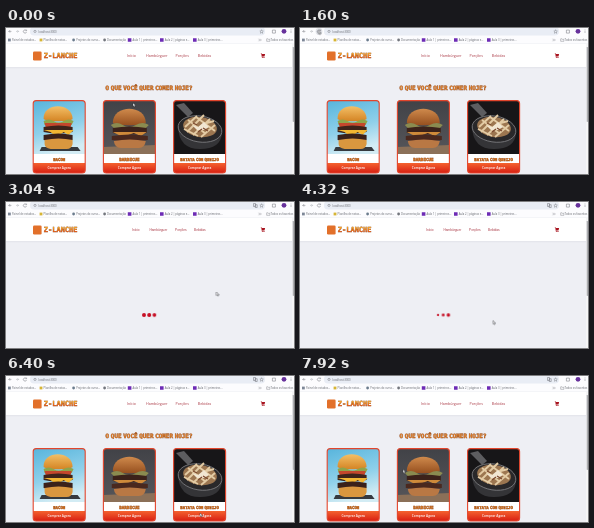
Write an HTML page that moves like this. It is 288 px wide and 146 px high and loops after 8000 ms.

```html
<!DOCTYPE html>
<html lang="pt-BR">
<head>
<meta charset="utf-8">
<title>Z-LANCHE</title>
<style>
html, body { margin: 0; width: 100%; height: 100%; overflow: hidden; background: #fff; }
svg { display: block; width: 288px; height: 146px; }
text { font-family: "Open Sans", sans-serif; }
.mark { font-size: 2.7px; fill: #62656c; }
.nav text { font-size: 3.6px; fill: #a83440; }
.nav.plain text { font: 3.2px "Liberation Sans", sans-serif; }
.slab { font-family: "DejaVu Sans Mono", monospace; font-weight: 700; word-spacing: -.3em; fill: #d9741a; stroke: #7a3410; stroke-width: .4px; paint-order: stroke; }
.mid { text-anchor: middle; }
.buy { font-size: 3.2px; font-weight: 600; fill: #fff; }

/* one 8 s timeline with hard cuts */
.cut { animation: 8s step-end infinite; }
#cards { animation-name: cards; }
#blank { animation-name: blank; }
#plain { animation-name: plain; }
#styled { animation-name: styled; }
#title { animation-name: title; }
#cart { animation-name: cart; }
#white { animation-name: white; }
#bar { animation-name: bar; }
#dots { animation-name: dots; }
#hover { animation-name: hover; }
#translate { animation-name: translate; }
@keyframes cards { 0%, 74% { visibility: visible } 22% { visibility: hidden } }
@keyframes blank { 0%, 25% { visibility: hidden } 22% { visibility: visible } }
@keyframes plain { 0%, 61% { visibility: hidden } 22% { visibility: visible } }
@keyframes styled {
  0%, 74% { visibility: visible; transform: none }
  22% { visibility: hidden; transform: none }
  61% { visibility: visible; transform: translateX(1.6px) }
}
@keyframes title {
  0%, 74% { visibility: visible; transform: none }
  22% { visibility: hidden; transform: none }
  61% { visibility: visible; transform: translateX(1.2px) }
}
@keyframes cart { 0%, 74% { transform: none } 61% { transform: translateX(4px) } }
@keyframes white { 0%, 74% { visibility: hidden } 61% { visibility: visible } }
@keyframes bar { 0%, 74% { visibility: visible } 61% { visibility: hidden } }
@keyframes dots { 0%, 61% { visibility: hidden } 36% { visibility: visible } }
@keyframes hover { 0%, 23% { visibility: hidden } 17% { visibility: visible } }
@keyframes translate { 0% { visibility: hidden } 34% { visibility: visible } }

#dots circle { transform-box: fill-box; transform-origin: center; animation: pulse 1s ease-in-out infinite; }
#dots circle:nth-child(2) { animation-delay: -.92s; }
#dots circle:nth-child(3) { animation-delay: -.84s; }
@keyframes pulse { 0%, 100% { transform: scale(1) } 50% { transform: scale(.4) } }

#cursor { animation: cursor 8s ease-in-out infinite; }
@keyframes cursor {
  0%, 1% { transform: translate(127px, 75px) }
  8% { transform: translate(115px, 84px) }
  15% { transform: translate(30px, 8px) }
  19%, 22% { transform: translate(18.5px, 2.5px) }
  31%, 33% { transform: translate(208px, 88px) }
  35%, 38% { transform: translate(210.5px, 90px) }
  46%, 74% { transform: translate(193px, 118.5px) }
  80%, 84% { transform: translate(194px, 137px) }
  95% { transform: translate(178px, 128px) }
  99%, 100% { transform: translate(103px, 93.5px) }
}
</style>
</head>
<body>
<svg viewBox="0 0 288 146">
  <defs>
    <linearGradient id="red" x2="0" y2="1">
      <stop stop-color="#f4622f"/><stop offset="1" stop-color="#d81f12"/>
    </linearGradient>
    <linearGradient id="gold" x2="0" y2="1">
      <stop offset=".2" stop-color="#f6a01c"/><stop offset=".9" stop-color="#d63a12"/>
    </linearGradient>
    <linearGradient id="sky" x2=".3" y2="1">
      <stop stop-color="#56b4dc"/><stop offset=".6" stop-color="#8fd0ea"/><stop offset="1" stop-color="#d3ecf4"/>
    </linearGradient>
    <linearGradient id="dusk" x2="0" y2="1">
      <stop stop-color="#414247"/><stop offset="1" stop-color="#56565a"/>
    </linearGradient>
    <linearGradient id="bun" x2="0" y2="1">
      <stop stop-color="#f3bf66"/><stop offset="1" stop-color="#d48424"/>
    </linearGradient>
    <linearGradient id="brioche" x2="0" y2="1">
      <stop stop-color="#cf8a4c"/><stop offset="1" stop-color="#96501f"/>
    </linearGradient>
    <linearGradient id="shade" x2="0" y2="1">
      <stop stop-color="#e2e3e9"/><stop offset="1" stop-color="#eeeff4"/>
    </linearGradient>
    <clipPath id="photo"><path d="M.6 54V3.6a3 3 0 0 1 3-3h46a3 3 0 0 1 3 3V54z"/></clipPath>
    <g id="frame">
      <path d="M.6 54H52.6V64H.6z" fill="#fff"/>
      <path d="M.6 63H52.6V70a3 3 0 0 1-3 3h-46a3 3 0 0 1-3-3z" fill="url(#red)"/>
      <rect x=".6" y=".6" width="52" height="72.4" rx="3" fill="none" stroke="#e2452c" stroke-width="1.1"/>
      <text class="buy mid" x="26.6" y="69.4">Comprar Agora</text>
    </g>
  </defs>

  <!-- page -->
  <rect width="288" height="146" fill="#eeeff4"/>
  <rect id="white" class="cut" y="79" width="288" height="67" fill="#fff"/>
  <rect y="39" width="288" height="2" fill="url(#shade)"/>
  <rect y="16" width="288" height="23" fill="#fff"/>

  <rect x="27" y="23.5" width="8.6" height="9" rx="1.2" fill="#e2702a"/>
  <text class="slab" x="37.8" y="30" font-size="7" style="fill:url(#gold)">Z-LANCHE</text>

  <g id="styled" class="nav cut">
    <text x="121" y="28.8">Início</text>
    <text x="140" y="28.8">Hambúrguer</text>
    <text x="169.5" y="28.8">Porções</text>
    <text x="191.8" y="28.8">Bebidas</text>
  </g>
  <g id="plain" class="nav plain cut">
    <text x="126" y="28.7">Início</text>
    <text x="143.5" y="28.7">Hambúrguer</text>
    <text x="169" y="28.7">Porções</text>
    <text x="188" y="28.7">Bebidas</text>
  </g>
  <g id="cart" class="cut" fill="#a8141f">
    <path d="M254.8 25.6h1l.3.5h3l-.6 2.4h-2.3l.1.5h2.2v.4h-2.6l-.6-3.3h-.5z"/>
    <circle cx="256.3" cy="29.5" r=".4"/><circle cx="258.1" cy="29.5" r=".4"/>
  </g>

  <text id="title" class="slab mid cut" x="143" y="62.3" font-size="5.9">O QUE VOCÊ QUER COMER HOJE?</text>

  <g id="cards" class="cut">
    <g transform="translate(26.6 72)">
      <g clip-path="url(#photo)">
        <rect width="54" height="55" fill="url(#sky)"/>
        <path d="M9 47H45L48 51H7z" fill="#363a3f"/>
        <path d="M11 19C10 2 40 2 40 19 37 22 14 22 11 19z" fill="url(#bun)"/>
        <path d="M11 21Q16 18 21 21T31 21T41 21L39 25H12z" fill="#8fa44a"/>
        <path d="M12 23H39L38 27H13z" fill="#c4472c"/>
        <path d="M11 27Q26 24 40 27V32Q26 35 11 32z" fill="#3f241a"/>
        <path d="M11 30H41L36 35 31 32 24 37 18 32z" fill="#f2b632"/>
        <path d="M11 35Q26 32 40 35V40Q26 43 11 40z" fill="#3a211a"/>
        <path d="M12 40Q26 37 40 40V44Q39 49 34 49H18Q12 48 12 44z" fill="#d9973f"/>
      </g>
      <use href="#frame"/>
      <text class="slab mid" x="26.6" y="60.8" font-size="4">BACON</text>
    </g>
    <g transform="translate(96.8 72)">
      <g clip-path="url(#photo)">
        <rect width="54" height="55" fill="url(#dusk)"/>
        <path d="M0 47 54 45V55H0z" fill="#8b7058"/>
        <path d="M10 23C10 4 43 4 43 23 38 26 15 26 10 23z" fill="url(#brioche)"/>
        <path d="M8 25Q14 21 20 25T33 25T46 25L42 29H12z" fill="#8a8b50"/>
        <path d="M10 28Q27 25 44 28V33Q27 36 10 33z" fill="#3c221a"/>
        <path d="M10 32H44L38 36 31 33 20 37z" fill="#cf8a3a"/>
        <path d="M9 36Q27 33 45 36V40Q27 43 9 40z" fill="#4a281e"/>
        <path d="M11 41Q27 38 43 41 42 48 36 48H18Q12 48 11 41z" fill="#b97844"/>
      </g>
      <use href="#frame"/>
      <text class="slab mid" x="26.6" y="60.8" font-size="4.2">BARBECUE</text>
    </g>
    <g transform="translate(167 72)">
      <g clip-path="url(#photo)">
        <rect width="54" height="55" fill="#171618"/>
        <path d="M3 5 11 3 20 13 15 17z" fill="#5d5d60"/>
        <path d="M5 27Q6 49 27 49T49 33z" fill="#343437"/>
        <ellipse cx="27" cy="29" rx="22" ry="13" transform="rotate(9 27 29)" fill="#29282a" stroke="#77777a" stroke-width=".9"/>
        <ellipse cx="27" cy="27" rx="17" ry="10" transform="rotate(9 27 27)" fill="#9c7650"/>
        <path d="M12 27 24 16M14 32 31 15M20 35 37 19M28 37 42 25M15 20 33 34M23 17 42 31M11 29 25 36M30 24 41 21" stroke="#e3cba4" stroke-width="1.9"/>
        <path d="M19 25 25 27 31 22 36 27 31 30 24 30z" fill="#f1e6d2"/>
        <path d="M20 23 24 25M30 28 35 31M25 32 29 29" stroke="#7c4a30" stroke-width="1.3"/>
      </g>
      <use href="#frame"/>
      <text class="slab mid" x="26.6" y="60.7" font-size="4">BATATA COM QUEIJO</text>
    </g>
  </g>

  <g id="dots" class="cut" fill="#c60d23">
    <circle cx="138" cy="113" r="2"/><circle cx="143.2" cy="113" r="2"/><circle cx="148.4" cy="113" r="2"/>
  </g>

  <g id="bar" class="cut">
    <rect x="286" y="16" width="2" height="130" fill="#f5f5f6"/>
    <rect x="286.8" y="19" width=".9" height="75" rx=".4" fill="#8d8f93"/>
  </g>
  <rect id="blank" class="cut" y="16" width="288" height="130" fill="#fff"/>

  <!-- browser toolbar -->
  <rect width="288" height="16" fill="#fcfcfe"/>
  <rect x="24" y="-1" width="235" height="8.4" rx="4" fill="#e9edf5"/>
  <rect y="15.6" width="288" height=".4" fill="#e6e8ed"/>
  <circle id="hover" class="cut" cx="19" cy="3.4" r="3.4" fill="#dfe1e7"/>
  <g fill="none" stroke="#6a6d74" stroke-width=".5">
    <path d="M5.4 3.4H2.8M4 2.2 2.8 3.4 4 4.6"/>
    <path d="M10 3.4h2.6M11.4 2.2 12.6 3.4 11.4 4.6" stroke="#a5a8ae"/>
    <path d="M20.3 2.6A1.6 1.6 0 1 0 20.5 4M20.6 1.6V2.7H19.5"/>
    <circle cx="29" cy="3.4" r="1.1"/>
    <path id="translate" class="cut" d="M247.5 1.5h2v3h-2zM249.2 2.7h2v2.8h-2z"/>
    <path d="M255.6 1.7 256.1 3 257.4 3.1 256.4 4 256.7 5.3 255.6 4.6 254.5 5.3 254.8 4 253.8 3.1 255.1 3z" stroke-width=".4"/>
    <path d="M266.4 2.1h3v3h-3z"/>
    <path d="M252.6 10.8 253.7 12 252.6 13.2M254.2 10.8 255.3 12 254.2 13.2" stroke-width=".4"/>
    <path d="M260.7 10.8h1.2l.4.5h1.6v2h-3.2z" stroke-width=".4"/>
  </g>
  <text class="mark" x="32.5" y="4.5">localhost:3000</text>
  <circle cx="278" cy="3.3" r="2.4" fill="#67319b"/>
  <g fill="#55585f">
    <circle cx="285" cy="1.9" r=".4"/><circle cx="285" cy="3.3" r=".4"/><circle cx="285" cy="4.7" r=".4"/>
  </g>
  <g>
    <rect x="2" y="10.6" width="2.8" height="2.8" fill="#7d8797"/>
    <rect x="33.6" y="10.6" width="2.8" height="2.8" fill="#d6b534"/>
    <circle cx="67.6" cy="12" r="1.4" fill="#6b7c8d"/>
    <circle cx="98.6" cy="12" r="1.4" fill="#73767d"/>
    <path d="M121.8 10.2h3.6v3.6h-3.6zM154 10.2h3.6v3.6H154zM187 10.2h3.6v3.6H187z" fill="#6d2bb5"/>
  </g>
  <g class="mark">
    <text x="6" y="13">Painel de estudos…</text>
    <text x="37.6" y="13">Planilha de notas…</text>
    <text x="70.2" y="13">Projetos do curso…</text>
    <text x="101" y="13">Documentação</text>
    <text x="126.5" y="13">Aula 1 | primeiros…</text>
    <text x="158.7" y="13">Aula 2 | páginas e…</text>
    <text x="191.7" y="13">Aula 3 | primeiros…</text>
    <text x="264.6" y="13">Todos os favoritos</text>
  </g>

  <path id="cursor" d="M0 0V3.6L.9 2.8 1.5 4.1 2.1 3.8 1.5 2.6H2.7z" fill="#fff" stroke="#25262b" stroke-width=".4"/>
</svg>
</body>
</html>
```
